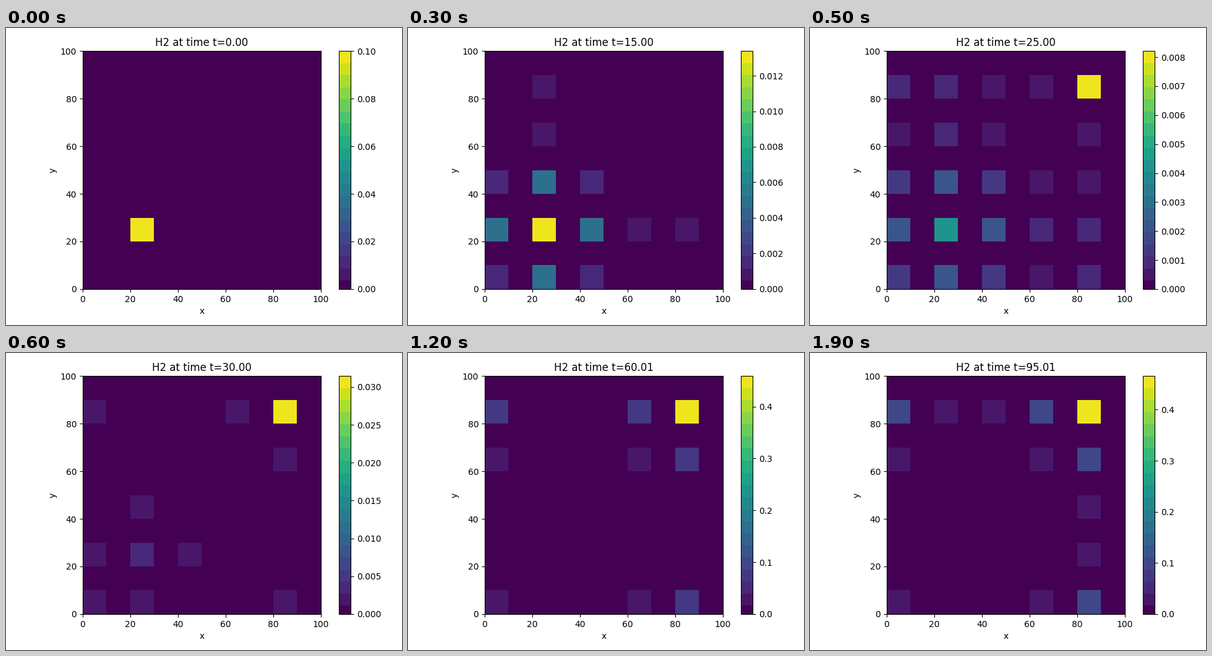
Write a matplotlib script that moves like this. It is 640x480 px and loops after 2000 ms.

```python
import numpy as np
import matplotlib.pyplot as plt
from matplotlib.animation import FuncAnimation
from matplotlib.colors import ListedColormap

W, H, DPI = 640, 480, 100
FRAMES, INTERVAL = 20, 100
SKIP = 500                      # solver steps per frame
TIMES = np.linspace(0, 100, 10000)

DIFFUSION = 0.025
CAPACITY, SHARPNESS = 0.5815, 1.1
DECAY, GROWTH = -0.055, 0.369


def laplacian(u):
    return sum(np.roll(u, s, axis) for axis in (0, 1) for s in (1, -1)) - 4 * u


def simulate():
    """Limited growth on one patch, decay elsewhere, diffusion on a 5x5 torus."""
    rate = np.full((5, 5), DECAY)
    rate[4, 4] = GROWTH
    u = np.zeros((5, 5))
    u[1, 1] = 0.1
    dt = TIMES[1]
    states = [u]
    for step in range(1, (FRAMES - 1) * SKIP + 1):
        limit = 1 - (u / CAPACITY) ** SHARPNESS
        u = u + dt * (rate * u * limit + DIFFUSION * laplacian(u))
        if step % SKIP == 0:
            states.append(u)
    return states


def spread(u):
    """Place the 5x5 sites on every second cell of the 10x10 field."""
    field = np.zeros((10, 10))
    field[::2, ::2] = u
    return field


def banded_viridis(first=9, width=13):
    index = np.arange(256)
    band = (index - first) // width
    middle = first + band * width + width // 2
    middle[index < first] = 0
    return ListedColormap(plt.get_cmap("viridis")(middle))


def axes_at(fig, left, bottom, width, height):
    return fig.add_axes([left / W, bottom / H, width / W, height / H])


states = simulate()

fig = plt.figure(figsize=(W / DPI, H / DPI), dpi=DPI)
SIDE, BOTTOM = 384.65, 58.1
ax = axes_at(fig, 123.95, BOTTOM, SIDE, SIDE)
cax = axes_at(fig, 538.2, BOTTOM, SIDE / 20, SIDE)

edges = np.linspace(0, 100, 11)
mesh = ax.pcolormesh(edges, edges, spread(states[0]), cmap=banded_viridis(),
                     vmin=0, vmax=0.1)
ax.set(xlabel="x", ylabel="y", xlim=(0, 100), ylim=(0, 100))
title = ax.set_title("")
bar = fig.colorbar(mesh, cax=cax)


def update(frame):
    u = states[frame]
    mesh.set_array(spread(u))
    mesh.set_clim(0, u.max())
    title.set_text(f"H2 at time t={TIMES[frame * SKIP]:.2f}")
    return mesh, title


anim = FuncAnimation(fig, update, frames=FRAMES, interval=INTERVAL,
                     init_func=lambda: update(0), repeat=True, repeat_delay=0)
plt.show()
```
